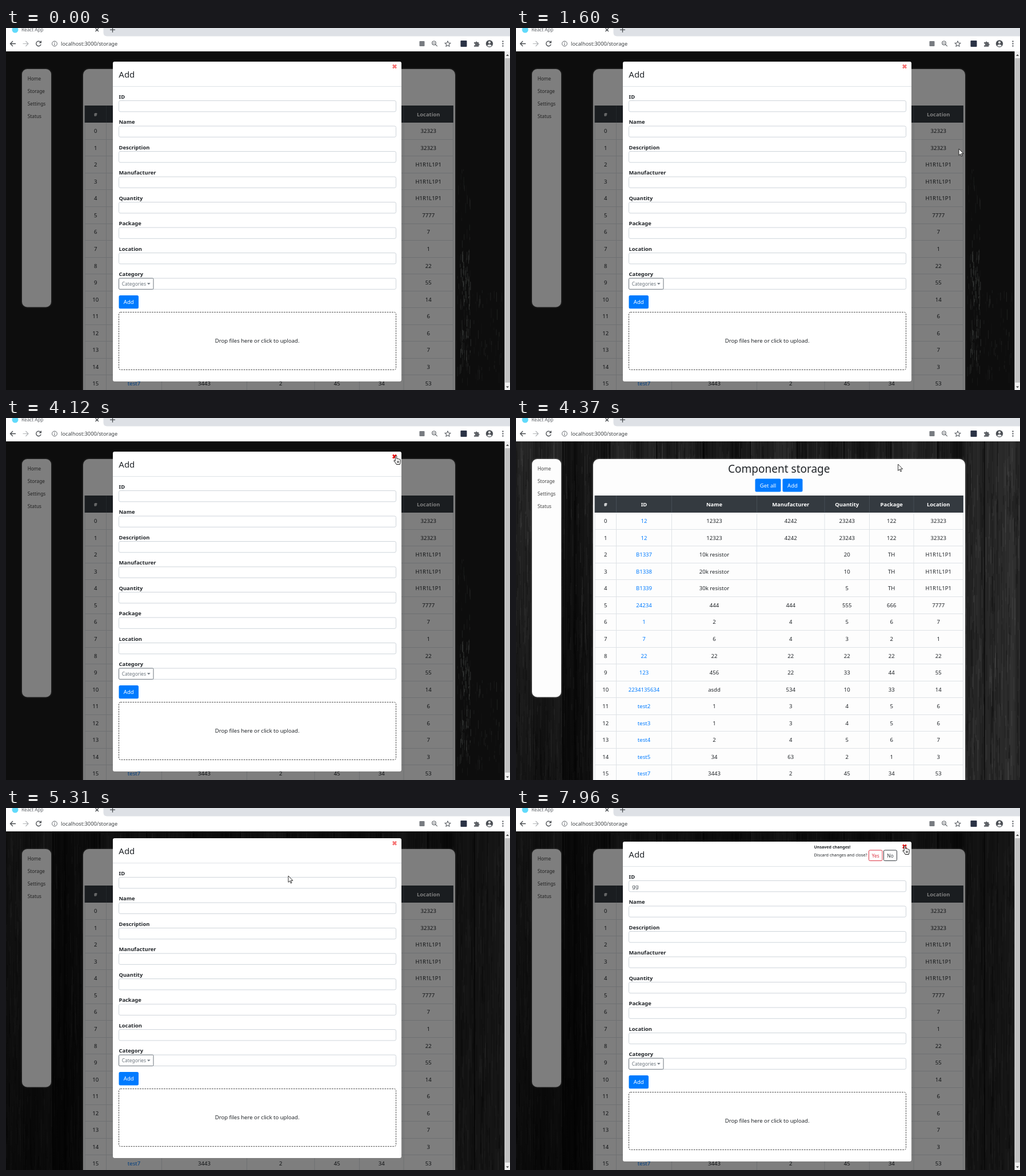
An HTML page with a canvas for the animation above (8000 ms loop, 882x635 px).

```html
<!DOCTYPE html>
<html lang="en">
<head>
<meta charset="utf-8">
<title>Component storage</title>
<style>
  html, body { margin: 0; width: 100%; height: 100%; overflow: hidden; background: #111; }
  canvas, svg { position: absolute; left: 0; top: 0; width: 882px; height: 635px; }
  text { font-family: "Noto Sans", "Open Sans", sans-serif; white-space: pre; }
</style>
</head>
<body>
<canvas id="wood" width="882" height="635"></canvas>
<canvas id="flat" width="882" height="635"></canvas>
<svg id="stage" viewBox="0 0 882 635"></svg>
<script>
const LOOP = 8000, BLUE = '#007bff', INK = '#212529';
const $ = id => document.getElementById(id);

// ---------- drawing helpers ----------
const rect = (x, y, w, h, fill, more = '') =>
  `<rect x="${x}" y="${y}" width="${w}" height="${h}" fill="${fill}" ${more}/>`;
const text = (x, y, s, size = 9.55, fill = INK, more = '') =>
  `<text x="${x}" y="${y}" font-size="${size}" fill="${fill}" ${more}>${s}</text>`;
const path = (d, stroke, width = 1, fill = 'none', more = '') =>
  `<path d="${d}" stroke="${stroke}" stroke-width="${width}" fill="${fill}" ${more}/>`;
const mid = 'text-anchor="middle"', bold = 'font-weight="700"', semi = 'font-weight="500"';
const button = (x, y, w, h, label) =>
  rect(x, y, w, h, BLUE, 'rx="2.5"') + text(x + w / 2, y + h / 2 + 3.5, label, 9.55, '#fff', mid);

// ---------- backgrounds ----------
let seed = 7;
const rnd = () => (seed = seed * 16807 % 2147483647) / 2147483647;

function drawWood() {
  const c = $('wood').getContext('2d');
  for (let x = 0; x < 882; x++) {
    const plank = Math.floor((x + 83) / 82);
    const v = 22 + 7 * Math.sin(plank * 2.3) + 5 * Math.sin(x / 9) + rnd() * 11 + (x > 780 ? 12 : 0);
    c.fillStyle = `rgb(${v},${v},${v})`;
    c.fillRect(x, 41, 1, 594);
  }
  for (let i = 0; i < 3500; i++) {
    c.fillStyle = rnd() < .5 ? 'rgba(255,255,255,.05)' : 'rgba(0,0,0,.2)';
    c.fillRect(rnd() * 882, 41 + rnd() * 594, 1 + rnd(), 10 + rnd() * 60);
  }
  c.fillStyle = 'rgba(0,0,0,.6)';
  for (let x = 819; x > 0; x -= 82) c.fillRect(x, 41, 2, 594);
  const shade = c.createLinearGradient(0, 41, 0, 635);
  shade.addColorStop(0, 'rgba(0,0,0,0)');
  shade.addColorStop(1, 'rgba(0,0,0,.45)');
  c.fillStyle = shade;
  c.fillRect(0, 41, 135, 594);
}

function drawFlat() {
  const c = $('flat').getContext('2d');
  c.fillStyle = '#1b1b1b';
  c.fillRect(0, 0, 882, 635);
  const streaks = (n, x, w, y, h, alpha) => {
    for (let i = 0; i < n; i++) {
      c.fillStyle = `rgba(150,158,154,${alpha * rnd()})`;
      c.fillRect(x + rnd() * w, y + rnd() * h, 1, 3 + rnd() * 16);
    }
  };
  streaks(110, 794, 19, 385, 215, .6);
  streaks(70, 787, 25, 240, 380, .3);
  streaks(80, 815, 55, 460, 150, .3);
}

// ---------- page ----------
function pageMarkup() {
  const edges = [138, 175.5, 272.5, 421.5, 540, 618.5, 696, 782.5];
  const heads = ['#', 'ID', 'Name', 'Manufacturer', 'Quantity', 'Package', 'Location'];
  const rows = `12|12323|4242|23243|122|32323
12|12323|4242|23243|122|32323
B1337|10k resistor||20|TH|H1R1L1P1
B1338|20k resistor||10|TH|H1R1L1P1
B1339|30k resistor||5|TH|H1R1L1P1
24234|444|444|555|666|7777
1|2|4|5|6|7
7|6|4|3|2|1
22|22|22|22|22|22
123|456|22|33|44|55
2234135634|asdd|534|10|33|14
test2|1|3|4|5|6
test3|1|3|4|5|6
test4|2|4|5|6|7
test5|34|63|2|1|3
test7|3443|2|45|34|53`.split('\n').map((r, i) => [i, ...r.split('|')]);
  const centre = i => (edges[i] + edges[i + 1]) / 2;

  let s = rect(28, 72, 51, 417.5, '#fdfdfd', 'rx="9" filter="url(#glow)"');
  ['Home', 'Storage', 'Settings', 'Status'].forEach((n, i) => s += text(37.7, 92 + i * 22, n, 8.3, '#444'));
  s += rect(135, 72, 651, 600, '#fdfdfd', 'rx="10" filter="url(#glow)"');
  s += text(460.3, 96.2, 'Component storage', 19, INK, `${mid} ${semi}`);
  s += button(418.5, 106.5, 45, 23, 'Get all') + button(466.5, 106.5, 35, 23, 'Add');
  s += rect(138, 136, 644.5, 30, '#343a40');
  heads.forEach((h, i) => s += text(centre(i), 154.6, h, 9.4, '#fff', `${mid} ${bold}`));
  edges.forEach(x => s += path(`M${x} 136V166`, '#454d55') + path(`M${x} 166V635`, '#dee2e6'));
  rows.forEach((r, i) => {
    const y = 180.9 + i * 29.53;
    s += path(`M138 ${Math.round(y + 14) + .5}H782.5`, '#dee2e6');
    r.forEach((v, j) => s += text(centre(j), y + 3.4, v, 9.55, j == 1 ? BLUE : INK, mid));
  });
  return s;
}

// ---------- dialog ----------
function modalMarkup() {
  const labels = ['ID', 'Name', 'Description', 'Manufacturer', 'Quantity', 'Package', 'Location', 'Category'];
  let s = rect(187, 59, 505, 561, '#fff', 'rx="3"') + path('M187 102.5H692', '#dee2e6');
  s += text(197.3, 87.2, 'Add', 15, INK, semi);
  s += path('M677 64.6l6 6m0-6l-6 6', '#f01414', 2.8, 'none', 'id="cross"');
  labels.forEach((n, i) => {
    const y = 127.5 + i * 44.5;
    s += text(197.5, y - 4, n, 9.4, INK, bold);
    s += rect(197.5, y, 485, 19.3, '#fff', 'stroke="#ced4da" rx="2.5"');
  });
  s += `<g id="ring">${rect(196.5, 126.5, 487, 21.3, 'none', `stroke="${BLUE}" stroke-opacity=".25" stroke-width="2" rx="3.5"`)}
    ${rect(197.5, 127.5, 485, 19.3, 'none', 'stroke="#80bdff" rx="2.5"')}</g>`;
  s += text(203, 141.3, '', 9.55, '#495057', 'id="typed"') + rect(203, 131, 1, 12.5, '#222', 'id="caret"');
  s += rect(197.5, 439, 60.5, 19.3, '#fff', 'stroke="#6c757d" rx="1.5"');
  s += text(202.8, 452, 'Categories', 8.4, '#6c757d') + path('M247 447.3h5.6l-2.8 3z', 'none', 0, '#6c757d');
  s += button(197.5, 469, 34.5, 23.3, 'Add');
  s += rect(197.5, 498.5, 485, 101, 'none', 'stroke="#444" stroke-dasharray="2.6 1.6" rx="3"');
  s += text(439.6, 552, 'Drop files here or click to upload.', 9.55, INK, mid);
  s += `<g id="warn">${text(521.5, 71, 'Unsaved changes!', 7.1, INK, bold)}
    ${text(521.5, 85.3, 'Discard changes and close?', 7.25)}
    ${rect(617.5, 74, 23.5, 18.5, '#fff', 'stroke="#dc3545" rx="2"')}${text(629.3, 86.5, 'Yes', 8.4, '#dc3545', mid)}
    ${rect(643.5, 74, 23, 18.5, '#fff', 'stroke="#343a40" rx="2"')}${text(655, 86.5, 'No', 8.4, '#343a40', mid)}</g>`;
  return s;
}

const scrollMarkup = () => rect(872.5, 41, 9.5, 594, '#f1f1f1') + rect(873.5, 53, 8.5, 569, '#c1c1c1') +
  path('M875 49l2.6-3 2.6 3zM875 628.5l2.6 3 2.6-3z', 'none', 0, '#505050');

// ---------- browser bar ----------
function barMarkup() {
  const grey = '#5f6368';
  return rect(0, 0, 882, 41, '#fff') +
    path('M170.5 0V8Q170.5 14.5 177 14.5H882V0z', 'none', 0, '#dee1e6') +
    '<circle cx="16" cy="3" r="5.5" fill="#61dafb"/>' +
    text(27, 6, 'React App', 8.2, grey) +
    path('M156.5 .5l5.5 5.5m0-5.5l-5.5 5.5M182 3.2h9M186.5 0V7.7', '#45494d', 1.3) +
    path('M17 27.5H7.5m4.5-4.5l-4.5 4.5 4.5 4.5', '#45494d', 1.3) +
    path('M29.5 27.5H39m-4.5-4.5l4.5 4.5-4.5 4.5', '#b0b3b6', 1.2) +
    path('M60.8 25.3a4.3 4.3 0 1 0 .4 3.3M61.4 22.6v3.3h-3.4', '#45494d', 1.3) +
    `<circle cx="85" cy="27.5" r="4.4" fill="none" stroke="${grey}"/>` + path('M85 27v3M85 24.8v1.2', grey, 1.1) +
    text(96, 31, 'localhost:3000/storage', 9.25, '#3c4043') +
    rect(723.5, 23, 9, 9, '#777b80', 'rx="1"') +
    `<circle cx="749" cy="26.3" r="3.3" fill="none" stroke="${grey}" stroke-width="1.2"/>` +
    path('M751.5 28.8l3.3 3.3M747.5 26.3h3', grey, 1.2) +
    path('M773 23l1.4 3.1 3.4.4-2.5 2.3.7 3.4-3-1.7-3 1.7.7-3.4-2.5-2.3 3.4-.4z', grey, 1.1) +
    rect(795.5, 22, 11, 11, '#2b3345', 'rx="1"') +
    path('M819 25h2.7a1.5 1.5 0 1 1 3 0h2.6v2.6a1.5 1.5 0 1 1 0 3v2.1h-8.3v-2.4a1.5 1.5 0 1 0 0-2.8z', 'none', 0, grey) +
    '<circle cx="846" cy="27.5" r="6.2" fill="#4d5156"/><circle cx="846" cy="25.3" r="2" fill="#fff"/>' +
    path('M842 31q4-4.5 8 0-4 3-8 0z', 'none', 0, '#fff') +
    [23.5, 27.5, 31.5].map(y => `<circle cx="869.5" cy="${y}" r="1.2" fill="${grey}"/>`).join('');
}

// ---------- pointers, each with its hot spot at 0,0 ----------
const pointers = {
  arrow: path('M0 0V11.3L2.6 8.9 4.4 13 6.1 12.2 4.3 8.3H8z', '#000', .8, '#fff'),
  hand: path('M-1.3 8V1.5a1.3 1.3 0 0 1 2.6 0V5.5l1-.3 1.4.6h1.2l1.1.6 1.3.3.4 1.2V11.5L6.7 15.5H.7L-.5 13-3.7 9.3-3 8.2-1.3 9.5zM2.5 9v4M4.5 9v4', '#000', .9, '#fff'),
  beam: path('M-2.5-6.5H-.7L0-6 .7-6.5H2.5M0-6V6M-2.5 6.5H-.7L0 6 .7 6.5H2.5', '#222', 1)
};

drawWood();
drawFlat();
$('stage').innerHTML = `<filter id="glow" x="-20%" y="-5%" width="140%" height="110%">
    <feDropShadow dx="0" dy="0" stdDeviation="1.6" flood-color="#fff" flood-opacity=".45"/></filter>
  <g>${pageMarkup()}</g>${rect(0, 41, 882, 594, '#000', 'id="dim"')}
  <g id="layer"><g id="modal">${modalMarkup()}</g>${scrollMarkup()}</g>
  ${barMarkup()}
  <g id="pointer">${Object.keys(pointers).map(k => `<g id="${k}">${pointers[k]}</g>`).join('')}</g>`;

// ---------- motion ----------
const route = [
  [0, 709, 650], [110, 709, 636], [500, 812, 420], [890, 775, 212], [2980, 775, 212], [3250, 691, 66],
  [3490, 684, 66], [3820, 684, 66], [3890, 682.5, 66], [4130, 682.5, 66], [4370, 669, 81], [4820, 490, 110],
  [4900, 494, 119], [5560, 494, 119], [5690, 503, 134], [7080, 503, 134], [7560, 695, 68], [7780, 680.5, 66]
];
const ramp = (t, from, len) => Math.min(1, Math.max(0, (t - from) / len));
const easeOut = u => 1 - (1 - u) ** 1.7;
const within = (t, a, b) => t >= a && t < b;
const show = (id, on) => $(id).setAttribute('visibility', on ? 'visible' : 'hidden');
const set = (id, name, value) => $(id).setAttribute(name, value);

function pointerAt(t) {
  const i = route.findIndex(p => p[0] > t);
  if (i < 0) return route[route.length - 1].slice(1);
  const a = route[i - 1], b = route[i], u = ramp(t, a[0], b[0] - a[0]);
  return [a[1] + (b[1] - a[1]) * u, a[2] + (b[2] - a[2]) * u];
}

function draw(t) {
  const [x, y] = pointerAt(t);
  const kind = within(t, 3280, 4190) || within(t, 4740, 5150) || t >= 7700 ? 'hand'
    : within(t, 5610, 7150) ? 'beam' : 'arrow';
  set('pointer', 'transform', `translate(${x} ${y})`);
  for (const k in pointers) show(k, k == kind);

  // opening, closing and the nudge after a click outside
  const opening = t > 4700;
  const alpha = opening ? ramp(t, 5100, 150) : 1 - ramp(t, 4135, 150);
  const lift = -33 * (opening ? 1 - easeOut(ramp(t, 5120, 300)) : easeOut(ramp(t, 4135, 300)));
  const nudge = [1060, 1760, 2460].reduce((s, from) => s + Math.sin(Math.PI * ramp(t, from, 540)), 0);
  const scale = 1 + .01 * Math.min(1, nudge * 1.1);
  set('modal', 'transform', `translate(439.5 ${339.5 + lift}) scale(${scale}) translate(-439.5 -339.5)`);
  set('layer', 'opacity', alpha);
  set('dim', 'opacity', .5 * (opening ? ramp(t, 5070, 150) : 1 - ramp(t, 4200, 150)));
  $('flat').style.opacity = 1 - ramp(t, 4200, 100);

  // form
  const count = t < 6760 ? 0 : t < 7010 ? 1 : 2;
  $('typed').textContent = 'g'.repeat(count);
  set('caret', 'x', 203 + count * 5.87);
  show('caret', within(t, 6000, 6530) || within(t, 6760, 7540));
  set('ring', 'opacity', ramp(t, 6000, 150) - ramp(t, 7780, 150));
  set('cross', 'opacity', kind == 'hand' && x > 600 ? 1 : .58);
  show('warn', t >= 7800);
}

function tick() {
  draw(performance.now() % LOOP);
  requestAnimationFrame(tick);
}
tick();
</script>
</body>
</html>
```
